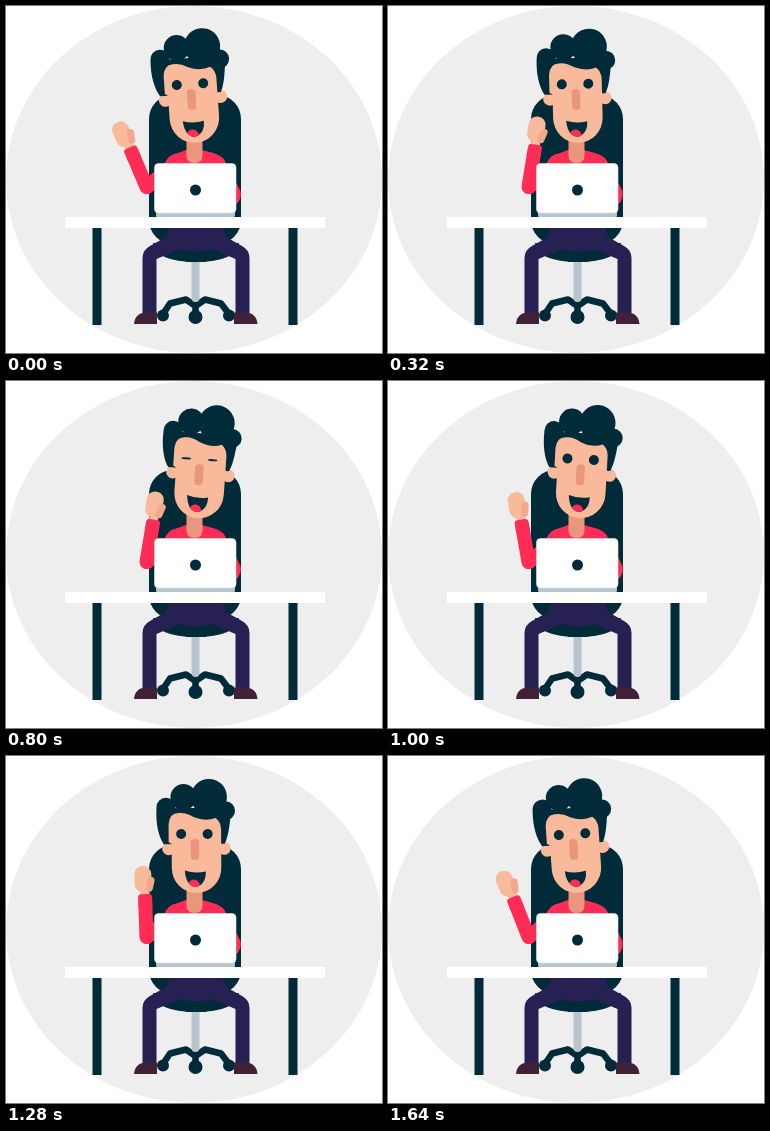
Write an HTML page that moves like this. It is 376x347 px and loops after 1680 ms.

```html
<!DOCTYPE html>
<html lang="en">
<head>
<meta charset="utf-8">
<title>Waving from the desk</title>
<style>
  html, body { margin: 0; width: 100%; height: 100%; overflow: hidden; background: #fff; }
  svg { display: block; width: 376px; height: 347px; }
  .navy { fill: #012b39; }
  .skin { fill: #f8ba9a; }
  .shade { fill: #ea967c; }
  .red { fill: #ff2d55; }
  .pants { fill: #272052; }
  .shoe { fill: #412138; }
  .steel { fill: #b7c5ce; }
  .sleeve { fill: none; stroke: #ff2d55; stroke-width: 14; stroke-linecap: round; }
  .base { fill: none; stroke: #012b39; stroke-width: 6.500; stroke-linecap: round; stroke-linejoin: round; }
</style>
</head>
<body>
<svg viewBox="0 0 376 347">
  <defs>
    <clipPath id="mouthClip"><path id="mouth" d="M179 114.500Q189 118 200 115.500Q200.500 126 193 130Q188 132 184 128.500Q179.500 124 179 114.500Z"/></clipPath>
  </defs>
  <ellipse cx="188" cy="173.500" rx="188" ry="173.500" fill="#eee"/>

  <g id="chair">
    <rect class="navy" x="143" y="89" width="92" height="149" rx="24"/>
    <path class="navy" d="M147 237Q150 256 190 256Q230 256 233 237Z"/>
    <path class="base" d="M157 308L164 297.500L180 293.500L189.500 300L199 293.500L215 297.500L223 308M189.500 300V311"/>
    <circle class="navy" cx="157" cy="309.500" r="6"/>
    <circle class="navy" cx="189.500" cy="311" r="7"/>
    <circle class="navy" cx="223" cy="309.500" r="6"/>
    <rect class="steel" x="185.500" y="250" width="8" height="46" rx="4"/>
    <rect class="navy" x="180" y="240" width="20" height="16"/>
  </g>

  <g id="legs">
    <path class="pants" d="M163 222H217L220 231L236 240Q243.500 244 243.500 252V308H229.500V253L206 243Q190 248 174 243L150.500 253V308H136.500V252Q136.500 244 144 240L160 231Z"/>
    <path class="shoe" d="M128 318Q129 306.500 141 306.500H151V318ZM251.500 318Q250.500 306.500 238.500 306.500H228V318Z"/>
  </g>

  <path class="red" d="M180 144L172 147Q160 149 158 160V200H228L232.500 196Q237 188 233 182Q230 176 221 160Q219 150 207 147L196 144Z"/>
  <path class="sleeve" d="M141 181L165 161"/>
  <path class="shade" d="M180.500 130H196.500V149Q196.500 157 188.500 157Q180.500 157 180.500 149Z"/>

  <g id="arm">
    <rect class="skin" x="-4.500" y="-54" width="9" height="18"/>
    <rect class="skin" x="-10" y="-71" width="17" height="26" rx="8"/>
    <rect x="2" y="-60" width="7" height="15" rx="3.500" fill="#f1a88b" transform="rotate(14 6 -52)"/>
    <path class="sleeve" d="M0 0V-33"/>
    <rect class="red" x="-7" y="-43" width="14" height="14" rx="3"/>
  </g>

  <g id="head">
    <circle class="skin" cx="163" cy="92.500" r="6.500"/>
    <circle class="skin" cx="218.500" cy="92.500" r="6.500"/>
    <g class="navy">
      <circle cx="160.500" cy="51" r="9.500"/>
      <circle cx="178" cy="41" r="13"/>
      <circle cx="203.500" cy="41" r="18"/>
      <circle cx="220" cy="55" r="9.500"/>
      <path d="M151 52H226C224 70 223 80 219 88H158C153 80 150 68 151 52Z"/>
    </g>
    <path class="skin" d="M166 112V88L163 86V68Q164 57 173 57Q180 56 188 61Q200 66 210 62Q215.500 66 215.500 74V112A24.750 25 0 0 1 166 112Z"/>
    <g class="navy">
      <ellipse class="eye" cx="175.500" cy="78" rx="5" ry="5"/>
      <ellipse class="eye" cx="202" cy="78" rx="5" ry="5"/>
    </g>
    <rect class="shade" x="185" y="83" width="8.500" height="21" rx="4"/>
    <use href="#mouth" class="navy"/>
    <circle class="red" cx="188" cy="129.500" r="6" clip-path="url(#mouthClip)"/>
  </g>

  <g id="desk">
    <path class="navy" d="M86.500 222H95.500V319H86.500ZM282.500 222H291.500V319H282.500Z"/>
    <rect class="steel" x="150" y="204" width="79" height="8" rx="3"/>
    <rect x="148.500" y="157.500" width="81.500" height="49.500" rx="4" fill="#fff" stroke="#dde2e6" stroke-width=".6"/>
    <circle class="navy" cx="189.500" cy="184" r="5.500"/>
    <rect x="59" y="211" width="260" height="11" fill="#fff"/>
  </g>
</svg>
<script>
  const LOOP = 1680, WAVES = 3, BLINK_AT = 800, EYE_RADIUS = 5;
  const arm = document.getElementById('arm');
  const head = document.getElementById('head');
  const eyes = document.querySelectorAll('.eye');

  function draw(now) {
    const t = now % LOOP;
    const phase = 2 * Math.PI * t / LOOP;
    const armAngle = -6 - 17 * Math.cos(WAVES * phase);
    const headAngle = -4 * Math.cos(phase);
    const open = Math.min(1, Math.max(0.2, (Math.abs(t - BLINK_AT) - 20) / 100));

    arm.setAttribute('transform', `translate(140.5 181) rotate(${armAngle})`);
    head.setAttribute('transform', `rotate(${headAngle} 188 146)`);
    eyes.forEach(eye => eye.setAttribute('ry', EYE_RADIUS * open));
  }

  const start = performance.now();
  function tick() {
    draw(performance.now() - start);
    requestAnimationFrame(tick);
  }
  tick();
</script>
</body>
</html>
```
